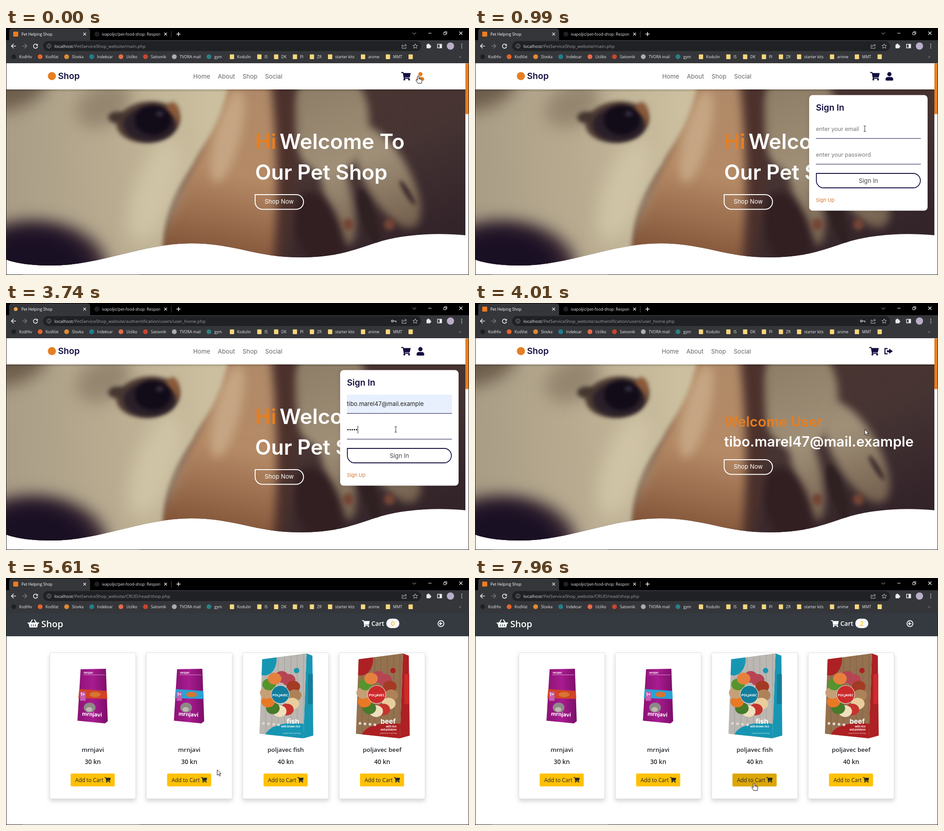
An HTML page with a canvas that plays this animation: 1024x547 px, repeating every 7990 ms.

```html
<!DOCTYPE html>
<html lang="en">
<head>
<meta charset="utf-8">
<title>Pet Helping Shop</title>
<style>
html, body { margin: 0; width: 100%; height: 100%; overflow: hidden; background: #000; }
canvas { display: block; width: 100vw; height: 100vh; }
</style>
</head>
<body>
<canvas id="stage"></canvas>
<script>
const W = 1024, H = 547, LOOP = 7990;
const POP = 'Inter, sans-serif', UI = '"Open Sans", "Noto Sans", sans-serif';
const ORANGE = '#e67e22', NAVY = '#130f40', INK = '#212529', PALE = '#e8eaed';
const EMAIL = 'tibo.marel47@mail.example';
const SUGGESTIONS = [EMAIL, 'tesalinic@mail.example', 'tesamarelin@post.example',
  '0950000000', 'tesa.marelin@school.example', 'tesamarelin01@mail.example'];

// each page visit: loading starts, page appears, loading ends
const VISITS = [
  { load: 3530, show: 3830, done: 4000, url: 'authentification/users/user_home.php' },
  { load: 4950, show: 5070, done: 5300, url: 'CRUD/read/shop.php' },
  { load: 6080, show: 6620, done: 6780, url: 'CRUD/read/shop.php' },
  { load: 7690, show: 7820, done: 7900, url: 'CRUD/read/shop.php' }];

const scale = window.devicePixelRatio || 1;
const stage = document.getElementById('stage');
stage.width = W * scale;
stage.height = H * scale;
let g = stage.getContext('2d');
g.scale(scale, scale);

const clamp = v => Math.max(0, Math.min(1, v));
const ramp = (t, start, length) => clamp((t - start) / length);
const ease = v => v * v * (3 - 2 * v);

// ---------- drawing helpers ----------
function rect(x, y, w, h, color) { g.fillStyle = color; g.fillRect(x, y, w, h); }

function round(x, y, w, h, r, fill, stroke, lw = 1) {
  g.beginPath();
  g.roundRect(x, y, w, h, r);
  if (fill) { g.fillStyle = fill; g.fill(); }
  if (stroke) { g.strokeStyle = stroke; g.lineWidth = lw; g.stroke(); }
}

function oval(x, y, rx, ry, color, turn = 0) {
  g.beginPath();
  g.ellipse(x, y, rx, ry, turn, 0, 7);
  g.fillStyle = color;
  g.fill();
}
const dot = (x, y, r, color) => oval(x, y, r, r, color);

function at(x, y, paint, turn = 0) {
  g.save();
  g.translate(x, y);
  g.rotate(turn);
  paint();
  g.restore();
}

function fill(d, x, y, color) {
  at(x, y, () => { g.fillStyle = color; g.fill(new Path2D(d)); });
}
function line(d, x, y, color, lw = 1.2) {
  at(x, y, () => { g.strokeStyle = color; g.lineWidth = lw; g.stroke(new Path2D(d)); });
}

function shadow(color, blur, dy, paint) {
  g.save();
  g.shadowColor = color;
  g.shadowBlur = blur * scale;
  g.shadowOffsetY = dy * scale;
  paint();
  g.restore();
}

function text(s, x, y, size, color, weight = 400, align = 'left', font = POP) {
  g.font = `${weight} ${size}px ${font}`;
  g.fillStyle = color;
  g.textAlign = align;
  g.fillText(s, x, y);
  return g.measureText(s).width;
}
const ui = (s, x, y, size, color, weight = 400, align = 'left') => text(s, x, y, size, color, weight, align, UI);

// ---------- icons ----------
function cartIcon(x, y, w, color) {
  at(x, y, () => {
    g.scale(w / 21, w / 21);
    fill('M0 0H4.7L5.7 2.3H21L19 11.7H8L8.2 12.8H18.5L18 15H6L3.6 2.3H0Z', 0, 0, color);
    for (const cx of [7, 17.4]) dot(cx, 16.7, 2.1, color);
  });
}
function userIcon(x, y, color) {
  dot(x + 8.5, y + 4.7, 4.7, color);
  round(x, y + 11, 17, 8, [5, 5, 2, 2], color);
}
function exitIcon(x, y) {
  line('M7 1.5H1.2V13H7', x, y, NAVY, 2.3);
  fill('M5.5 5.2H10.5V1.5L18.5 7.3L10.5 13V9.4H5.5Z', x, y, NAVY);
}
function basketIcon(x, y) {
  fill('M0 7.5H25V10H23L21 18.5H4L2 10H0Z', x, y, '#fff');
  line('M6 8L10.5 1M19 8L14.5 1', x, y, '#fff', 2.2);
  for (const bar of [8, 12.5, 17]) rect(x + bar - .7, y + 11.5, 1.4, 4.5, '#343a40');
}
function star(cx, cy, r, color) {
  g.beginPath();
  for (let i = 0; i < 10; i++) {
    const a = i * Math.PI / 5, k = i % 2 ? r * .45 : r;
    g.lineTo(cx + Math.sin(a) * k, cy - Math.cos(a) * k);
  }
  g.closePath();
  g.strokeStyle = color;
  g.lineWidth = 1;
  g.stroke();
}
const cross = (x, y, size, color) => line(`M0 0L${size} ${size}M${size} 0L0 ${size}`, x, y, color);

// ---------- browser frame ----------
const MARKS = { KodHiv: '#1c2024', KodVat: '#e5652a', Slovka: '#e08a32', Indeksar: '#1f7f8e',
  Ucilko: '#e56b4a', Satovnik: '#c8452e', 'TVORA mail': '#a9adb2', gym: '#2b7f84' };
const FOLDERS = ['Kodulin', 'IS', 'DK', 'PI', 'ZR', 'starter kits', 'anime', 'MMT', ''];

function browser(url, loading, key) {
  const soft = '#c4c7cb', grey = '#9aa0a6';
  rect(0, 0, W, 28, '#000');
  round(7, 1, 179, 32, 6, '#35363a');
  rect(0, 27, W, 51, '#35363a');
  if (loading) dot(21.5, 13.5, 4.3, '#f0a04a');
  else round(16, 8, 11, 11, 1.5, '#f07c1e');
  ui('Pet Helping Shop', 34, 17, 8.6, '#fff');
  dot(201, 13.5, 5.5, '#1d2126');
  g.save();
  g.beginPath(); g.rect(205, 0, 136, 27); g.clip();
  ui('ivapoljic/pet-food-shop: Respons', 212, 17, 8.8, PALE);
  g.restore();
  for (const x of [171, 350]) cross(x, 10.5, 6, PALE);
  rect(365, 7, 1, 14, '#4a4c50');
  line('M0 4.5H9M4.5 0V9', 377, 9, '#fff', 1.5);
  line('M0 0L4 4L8 0', 899, 10, '#bbb', 1);
  rect(934, 11, 7, 1, '#fff');
  line('M0 2H5V7H0ZM2 2V0H7V5H5', 968, 8, '#fff', 1);
  cross(1002.5, 8, 7, '#fff');

  line('M5 0L0 5L5 10M0 5H10', 12, 35, PALE, 1.6);
  line('M5 0L10 5L5 10M0 5H10', 36, 35, '#75777b', 1.6);
  line('M9 2.5A4.6 4.6 0 1 0 9.8 6', 60, 35, PALE, 1.6);
  fill('M10.5 0V4.5H6Z', 60, 35, PALE);
  round(82, 29, 836, 22, 11, '#202124');
  round(90.5, 35.5, 9, 9, 4.5, null, grey);
  line('M0 0V1M0 2V5', 95, 37.5, grey);
  const w = ui('localhost', 107, 43.5, 9.8, PALE);
  ui('/PetServiceShop_website/' + url, 107 + w, 43.5, 9.8, grey);
  if (key) {
    round(852.5, 38, 4, 4, 2, null, soft, 1.6);
    line('M0 0H6V3', 856.5, 40, soft, 1.6);
  }
  line('M3 3H0V10H9V7M3 7Q3 3 8 3M6.5 .5L10 3L6.5 5.5', 876, 35, soft, 1);
  star(905, 40.5, 5.5, soft);
  round(930, 36.5, 8.5, 8.5, 1, PALE);
  dot(934, 36.5, 2, PALE);
  dot(938.5, 41, 2, PALE);
  round(954.5, 36, 9, 8, 0, null, PALE, 1.5);
  rect(959, 36, 5, 8, PALE);
  dot(983, 40, 8, '#b9aec8');
  for (let i = -1; i < 2; i++) dot(1008, 40 + i * 4, 1.1, PALE);

  let x = 29;
  for (const name in MARKS) {
    dot(x - 12, 63.5, 5.3, MARKS[name]);
    x += 30 + ui(name, x, 67, 8.6, PALE);
  }
  x = 511;
  for (const name of FOLDERS) {
    round(x - 16, 58.5, 9.5, 10.5, 1, '#f6d77c');
    x += 30 + ui(name, x, 67, 8.6, PALE);
  }
  ui('»', 1002, 67, 10, '#85888c');
}

// ---------- hero picture: a few soft shapes ----------
const hero = document.createElement('canvas');
hero.width = stage.width;
hero.height = stage.height;

const WAVE = 'M1 136H1016V459C950 453 885 457 830 472C780 487 740 508 650 508' +
  'C555 508 505 477 410 477C300 477 210 526 100 526C60 526 25 522 1 513Z';

function blurred(px, paint) {
  g.filter = `blur(${px * scale}px)`;
  paint();
  g.filter = 'none';
}

function fade(x0, y0, x1, y1, ...colors) {
  const f = g.createLinearGradient(x0, y0, x1, y1);
  colors.forEach((c, i) => f.addColorStop(i / (colors.length - 1), c));
  return f;
}

function paintHero() {
  const main = g;
  g = hero.getContext('2d');
  g.scale(scale, scale);
  g.clip(new Path2D(WAVE));
  rect(0, 130, W, 400, fade(620, 136, 800, 520, '#4b3531', '#463433', '#33242a'));

  const fur = fade(700, 136, 820, 460, '#8f7f68', '#a09078', '#75614f');
  blurred(9, () => {
    oval(715, 205, 88, 120, fur);
    oval(733, 365, 30, 118, fur, -.24);
    oval(843, 330, 50, 125, fur, -.5);
    oval(690, 450, 50, 90, '#321f22', -.3);
  });
  blurred(5, () => {
    oval(802, 420, 16, 65, '#2f2022', -.3);
    oval(888, 365, 6, 32, '#3a292a', -.55);
    for (const cx of [757, 848]) oval(cx, 435, 12, 13, '#744536');
  });

  blurred(10, () => {
    fill('M560 110H632C650 250 640 400 615 530H540Z', 0, 0, '#4c312c');
    fill('M470 110H585C600 250 605 380 590 530H320C360 400 400 330 430 260Z', 0, 0,
      fade(520, 140, 450, 500, '#b08a68', '#b58a66', '#835539'));
    oval(490, 240, 28, 105, '#c5a583', .25);
  });

  blurred(5, () => fill('M-20 110H495C475 220 440 250 415 300C370 370 345 400 345 540H-20Z', 0, 0,
    fade(0, 250, 450, 230, '#a99d86', '#b8ab90', '#cbbf9f')));
  blurred(18, () => {
    oval(10, 135, 85, 45, '#6d5d4c', -.3);
    oval(215, 170, 65, 45, '#94866f', -.5);
    oval(330, 360, 45, 120, '#cfc3a5', .35);
    oval(60, 535, 165, 108, '#3a2833');
    oval(60, 545, 130, 100, '#1a1024');
  });
  blurred(5, () => {
    oval(314, 208, 70, 45, '#4f3c34', -.12);
    oval(246, 198, 20, 13, '#443630');
    oval(368, 192, 16, 28, '#8b5a3a');
    oval(318, 214, 58, 38, '#2a2029');
    oval(325, 204, 40, 33, '#120b18');
    oval(340, 190, 8, 4, '#4a4458');
  });
  g = main;
}

// ---------- landing pages ----------
function shopNow(y, hover) {
  round(551, y + 1, 107, 32.5, [0, 17, 17, 17], `rgba(255,255,255,${hover})`, '#fff', 2);
  text('Shop Now', 572, y + 21, 13.2, hover > .5 ? NAVY : '#fff');
}

function landing(t, user) {
  rect(0, 78, W, H, '#fff');
  g.drawImage(hero, 0, 0, W, H);
  rect(1, 136, 1015, 6, fade(0, 136, 0, 142, 'rgba(0,0,0,.18)', 'rgba(0,0,0,0)'));
  dot(101.5, 106.5, 9, ORANGE);
  text('Shop', 115, 113, 19.3, NAVY, 600);
  let x = user ? 413 : 414;
  for (const s of ['Home', 'About', 'Shop', 'Social']) x += 17 + text(s, x, 112, 13.4, '#666');
  cartIcon(user ? 872 : 874, 97.5, 21, NAVY);
  if (user) exitIcon(905.5, 99.5);
  else userIcon(908, 97.5, t < 660 ? ORANGE : NAVY);
  round(1016, 78, 7, 113, 3, ORANGE);
  if (user) {
    text('Welcome User', 551, 274, 31, ORANGE, 600);
    text(EMAIL, 551, 318, 31, '#fff', 600);
    shopNow(346, ramp(t, 4780, 90));
  } else {
    text('Hi', 551, 268, 46.5, ORANGE, 600);
    text('Welcome To', 605, 268, 46.5, '#fff', 600);
    text('Our Pet Shop', 551, 336, 46, '#fff', 600);
    shopNow(368, 0);
    signIn(t);
    suggestions(t);
  }
}

function signIn(t) {
  const p = ramp(t, 400, 230);
  if (!p) return;
  const chosen = t >= 1890, filled = t >= 1600, password = t >= 2150;
  g.save();
  g.globalAlpha = p;
  g.translate(0, 26 * (1 - p));
  shadow('rgba(0,0,0,.15)', 10, 0, () => round(739, 148.5, 262, 256, 8, '#fff'));
  text('Sign In', 754, 183, 19, NAVY, 600);
  if (chosen) rect(754, 203, 232, 42, '#e8f0fe');
  const w = text(filled ? EMAIL : 'enter your email', 754, 228, filled ? 13 : 12.5, filled ? '#222' : '#777');
  if (t >= 1120 && !password) rect(chosen ? 755 + w : 754, 215, 1, 16, '#222');
  const typed = [2300, 2430, 2740, 3070, 3200].filter(k => t >= k).length;
  if (!typed) text('enter your password', 754, 285, 12.5, '#777');
  for (let i = 0; i < typed; i++) dot(756.3 + i * 4.75, 280.5, 1.6, '#111');
  if (password) rect(754 + typed * 4.75, 272, 1, 17, NAVY);
  for (const y of [244, 301]) rect(754, y, 232, 1, NAVY);
  round(755, 322, 230, 32, [0, 17, 17, 17], null, NAVY, 1.8);
  text('Sign In', 870, 342.5, 13.2, '#444', 400, 'center');
  text('Sign Up', 754, 385, 11, '#d37530');
  g.restore();
}

function suggestions(t) {
  const a = ramp(t, 1200, 80) * (1 - ramp(t, 1880, 130));
  if (!a) return;
  g.save();
  g.globalAlpha = a;
  shadow('rgba(0,0,0,.3)', 4, 0, () => round(829, 256, 150.5, 162, 2, '#fff'));
  if (t > 1560) rect(829, 256, 150.5, 27, '#e6e6e6');
  SUGGESTIONS.forEach((s, i) => ui(s, 838, 273 + i * 26.6, 9, '#555'));
  g.restore();
}

// ---------- shop page ----------
function smallBag(band) {
  const front = 'M68 37L124 36L128 152L122 157L61 151Z';
  fill(front, 0, 0, fade(61, 0, 128, 0, '#8c1276', '#a81c90', '#7c0d69'));
  text('mrnjavi', 75, 47, 5.5, '#fff', 700);
  rect(74, 49, 48, .8, '#e5b5dc');
  fill('M65 81L126 85L127 103L63 101Z', 0, 0, band);
  oval(100, 93, 12, 6, '#d77532');
  rect(67, 87, 12, 20, '#c65caf');
  text('1+', 68, 96, 9, '#fff', 700);
  oval(88, 122, 13, 11, '#8e8988');
  oval(87, 126, 7, 5, '#c0b9b3');
  at(93, 141, () => text('mrnjavi', 0, 0, 12, '#fff', 700, 'center'), .06);
}

const FOODS = ['#b74453', '#b74453', '#a33a24', '#ad8258', '#e8cd9d', '#c6342e',
  '#f0dfbd', '#477a2b', '#e87925', '#c5a077', '#55942e', '#e6803e'];

function bigBag({ main, disc, wood, name, note }) {
  const front = 'M43 15L141 2L134 190L37 180Z';
  fill('M141 2L154 7L156 184L134 190Z', 0, 0, main);
  rect(144, 48, 11, 66, disc);
  g.save();
  g.clip(new Path2D(front));
  rect(30, 0, 120, 195, wood);
  for (let x = 50; x < 140; x += 14) rect(x, 0, 1, 190, 'rgba(43,28,18,.18)');
  oval(48, 15, 27, 36, main);
  oval(112, 186, 62, 30, main);
  g.restore();
  dot(119, 40, 6, main);
  FOODS.forEach((c, i) => {
    const a = i / FOODS.length * 2 * Math.PI - 1.5;
    oval(84 + Math.cos(a) * 31, 92 + Math.sin(a) * 38, 15, 13, c);
  });
  dot(83, 93, 20.5, '#e9e6df');
  dot(83, 93, 19.5, disc);
  ui('POLJAVEC', 83, 97, 7.2, '#fff', 700, 'center');
  for (let i = 0; i < 4; i++) dot(46 + i * 11, 157 + i, 3, '#ddd8cf');
  text(name, 125, 158, 15, '#fff', 700, 'right');
  note.forEach((s, i) => text(s, 127, 166 + i * 6.5, 5.6, '#fff', 700, 'right'));
  ui('complete food for adult dogs', 128, 180, 2.9, '#fff', 400, 'right');
}

const FISH = { main: '#1796b3', disc: '#147d9c', wood: '#bbb7b2', name: 'fish', note: ['with brown rice'] };
const BEEF = { main: '#ad2023', disc: '#cc2b2c', wood: '#94714f', name: 'beef', note: ['with rice', 'and potatoes'] };
const ITEMS = [['mrnjavi', 30, () => smallBag('#d14327')], ['mrnjavi', 30, () => smallBag('#2aa2d4')],
  ['poljavec fish', 40, () => bigBag(FISH)], ['poljavec beef', 40, () => bigBag(BEEF)]];

function card([name, price, art], hover) {
  shadow('rgba(0,0,0,.17)', 10, 5, () => round(0, 0, 190, 324, 3, '#fff'));
  round(0, .5, 190, 323.5, 3, null, '#dedede');
  art();
  ui(name, 95, 220, 13.4, INK, 600, 'center');
  ui(price + ' kn', 95, 247, 13.6, INK, 600, 'center');
  round(46, 268, 97.5, 28.5, 2.5, '#ffc107');
  round(46, 268, 97.5, 28.5, 2.5, `rgba(220,166,5,${hover})`);
  ui('Add to Cart', 56, 287, 11.8, INK);
  cartIcon(121, 276, 13.5, INK);
}

// the debug listing pushes the page down and brings a scrollbar
function shop(count, listing, hovers) {
  const narrow = listing ? 1 : 0;
  rect(0, 78, W, H, '#fff');
  if (listing) ui('Array ( [0] => Array ( [product_id] => 14 ) )', 1, 92, 11.8, INK);
  at(0, 18 * narrow, () => {
    rect(1, 78, 1023, 51, '#343a40');
    basketIcon(48, 91);
    ui('Shop', 78, 109, 20, '#fff', 600);
    at(-10.5 * narrow, 0, () => {
      cartIcon(787.5, 93.5, 17, '#fff');
      ui('Cart', 808, 106, 14, '#fff', 600);
      round(841, 90, 29, 21, 10.5, '#f8f9fa');
      ui(count, 855.5, 106, 14, '#ffc107', 600, 'center');
    });
    at(962 - 12.5 * narrow, 101, () => {
      round(-6.5, -6.5, 13, 13, 6.5, null, '#fff', 1.8);
      line('M3 0H-3M0 -3L-3 0L0 3', 0, 0, '#fff', 1.8);
    });
    ITEMS.forEach((item, i) => at(97 - 6 * narrow + i * 213.3, 165, () => card(item, hovers[i] || 0)));
  });
  if (listing) {
    rect(1011, 78, 12, 469, '#f1f1f1');
    rect(1012, 91, 10, 434, '#c1c1c1');
    fill('M-3 0H3L0 -3Z', 1017, 86, '#777');
    fill('M-3 0H3L0 3Z', 1017, 538, '#444');
  }
}

// ---------- pointer ----------
const MOVES = [[600, 960, 862, 223], [1320, 1640, 863, 273], [2020, 2080, 862, 280],
  [4320, 4850, 561, 361], [5160, 5880, 424, 454], [6820, 7700, 617, 454]];
const CLICKS = [270, 1090, 1800, 2100, 4850, 5970, 7700];

function pointer(t) {
  let x = 911.5, y = 106;
  for (const [start, end, tx, ty] of MOVES) {
    const k = ease(ramp(t, start, end - start));
    x += (tx - x) * k;
    y += (ty - y) * k;
  }
  if (CLICKS.some(c => t >= c && t < c + 110)) dot(x, y + 1, 10, 'rgba(255,238,50,.75)');
  const within = (a, b) => t > a && t < b;
  const hand = within(-1, 660) || within(4780, 5070) || within(5800, 6960) || t > 7570;
  const beam = within(900, 1400) || within(2010, 3900);
  if (beam) {
    line('M-2.5 -6H2.5M0 -6V6M-2.5 6H2.5', x, y, '#222', 1);
    return;
  }
  const shape = hand ? 'M-1.6 1Q0 -1.2 1.6 1V5.5L7 7Q9 8 8.5 11L7.2 16.5H-.6L-4.6 10.6Q-5.2 7.8 -3 8.8L-1.6 10.2Z'
    : 'M0 0V12L2.8 9.5L4.8 14L7 13L5 8.7H8.6Z';
  fill(shape, x, y, '#fff');
  line(shape, x, y, '#111', 1);
  if (hand) line('M1.7 5V8M4.2 6.5V9M6.5 7V9.5', x, y, '#111', .7);
}

function draw(t) {
  const shown = VISITS.filter(v => t >= v.show).length;
  const opened = VISITS.filter(v => t >= v.load).pop();
  const loading = VISITS.some(v => t >= v.load && t < v.done);
  const third = ramp(t, 7570, 130);
  if (shown < 2) landing(t, shown === 1);
  else if (shown === 2) shop(0, false, [0, ramp(t, 5750, 150)]);
  else if (shown === 3) shop(1, true, [0, ramp(t, 6620, 150) * (1 - ramp(t, 6960, 150)), third]);
  else shop(2, false, [0, 0, ramp(t, 7820, 130)]);
  browser(opened ? opened.url : 'main.php', loading, t >= 2200 && shown < 2);
  for (const x of [0, W - 1]) rect(x, 78, 1, H, '#222');
  rect(0, 546, W, 1, '#181818');
  rect(37, 546, 258, 1, '#4a4a4a');
  pointer(t);
}

paintHero();
function frame(now) {
  draw(now % LOOP);
  requestAnimationFrame(frame);
}
requestAnimationFrame(frame);
</script>
</body>
</html>
```
